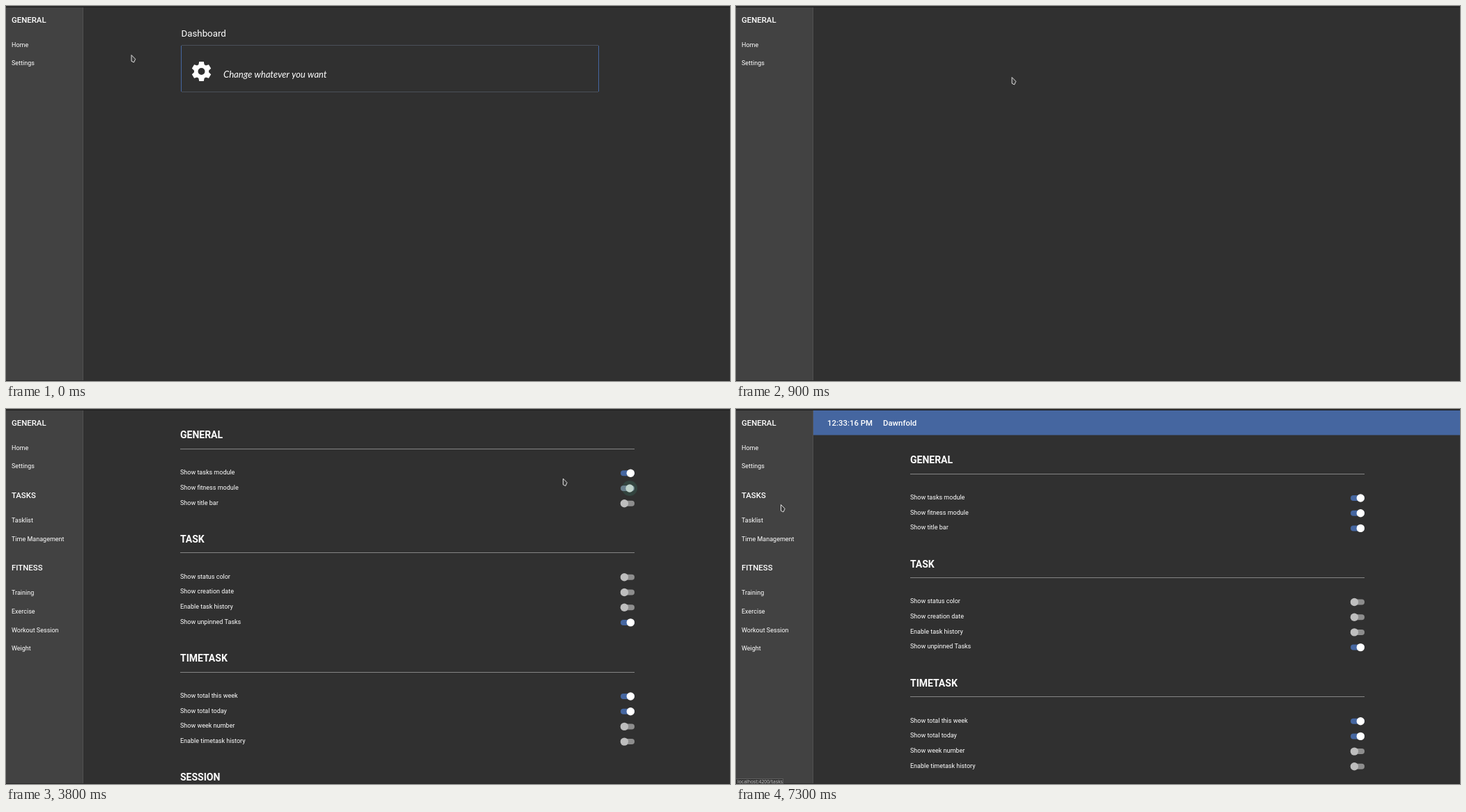
Recreate the animation shown at these times as an HTML page with a canvas. Size 1039 px wide and 539 px high, loop 8000 ms.

```html
<!DOCTYPE html>
<html lang="en">
<head>
<meta charset="utf-8">
<title>Settings demo</title>
<style>
  html, body { margin: 0; width: 100%; height: 100%; overflow: hidden; background: #303030; }
  canvas { display: block; }
</style>
</head>
<body>
<canvas id="stage" width="1039" height="539"></canvas>
<script>
const ctx = document.getElementById('stage').getContext('2d');
const LOOP = 8000, BLUE = '#4566a0', BACK = '#303030';

// Pointer positions: time, x, y, hovered item (any hovered item shows the hand).
const pointer = [
  [0, 179.5, 70], [300, 200, 73], [400, 246, 80], [500, 308, 90, 'card'],
  [600, 355, 97, 'card'], [700, 384, 101, 'card'], [800, 392, 102, 'card'],
  [900, 395.5, 102], [1000, 470, 140], [1100, 558, 173], [1200, 606, 168],
  [1300, 662, 158], [1400, 718, 147], [1500, 768, 137], [1600, 808, 129],
  [1700, 842, 121], [1800, 866, 114], [1900, 880, 110], [2000, 885, 107, 'fitness'],
  [2100, 887, 102, 'tasks'], [2200, 889, 99, 'tasks'], [2300, 890, 97, 'tasks'],
  [2400, 891, 95, 'tasks'], [2500, 892, 94, 'tasks'], [2600, 893, 93, 'tasks'],
  [3300, 893, 112, 'fitness'], [3800, 799, 99.5], [4300, 74, 185, 'link'],
  [4700, 36, 308, 'link'], [5300, 704, 168], [5700, 893.5, 137, 'title'],
  [6300, 895, 137], [6900, 144, 101], [7300, 64, 137]
];

const menu = [
  ['GENERAL', 'Home', 'Settings'],
  ['TASKS', 'Tasklist', 'Time Management'],
  ['FITNESS', 'Training', 'Exercise', 'Workout Session', 'Weight']
];

// Rows: label, then true, or the id of a switch that changes over time.
const sections = [
  ['GENERAL', ['Show tasks module', 'tasks'], ['Show fitness module', 'fitness'], ['Show title bar', 'title']],
  ['TASK', ['Show status color'], ['Show creation date'], ['Enable task history'], ['Show unpinned Tasks', true]],
  ['TIMETASK', ['Show total this week', true], ['Show total today', true], ['Show week number'], ['Enable timetask history']],
  ['SESSION']
];
const switchedOn = { tasks: 3300, fitness: 3800, title: 6300 };
const rippleEnd = { fitness: 4300, title: 6900 };

function rect(x, y, w, h, color) {
  ctx.fillStyle = color;
  ctx.fillRect(x, y, w, h);
}

function disc(x, y, r, color) {
  ctx.fillStyle = color;
  ctx.beginPath();
  ctx.arc(x, y, r, 0, 7);
  ctx.fill();
}

// Places text by the middle of its capitals.
function text(str, x, middle, size, weight = '400', color = '#fff', family = 'Roboto') {
  ctx.font = `${weight} ${size}px ${family}, sans-serif`;
  ctx.fillStyle = color;
  ctx.fillText(str, x, middle + size * 0.355);
}

function sidebar(t) {
  rect(0, 2, 110, 537, '#424242');
  rect(110, 2, 1, 537, '#505050');
  const groups = t >= 3800 ? 3 : t >= 3300 ? 2 : 1;
  menu.slice(0, groups).forEach(([head, ...items], g) => {
    const y = 19.5 + g * 104.3;
    text(head, 8, y, 11.4, '500');
    items.forEach((item, i) => text(item, 8, y + 35.9 + i * 26.75, 9));
  });
}

function gear(x, y) {
  ctx.save();
  ctx.translate(x, y);
  ctx.scale(1.42, 1.42);
  ctx.beginPath();
  for (let i = 0; i < 6; i++) {
    for (const [px, py] of [[-2.9, -6.9], [-2.3, -9.8], [2.3, -9.8], [2.9, -6.9]]) ctx.lineTo(px, py);
    ctx.rotate(Math.PI / 3);
  }
  ctx.closePath();
  ctx.moveTo(3.5, 0);
  ctx.arc(0, 0, 3.5, 0, 7);
  ctx.fillStyle = '#fff';
  ctx.fill('evenodd');
  ctx.restore();
}

function dashboard(hovered) {
  text('Dashboard', 251.5, 39, 13.3);
  if (hovered) rect(251, 57, 600, 67, '#474546');
  rect(252, 56, 598, 1, '#4a5059');
  rect(252, 123, 598, 1, '#4a5059');
  rect(251, 57, 1, 66, BLUE);
  rect(850, 57, 1, 66, BLUE);
  gear(280.5, 94);
  text('Change whatever you want', 312, 98.5, 13.1, 'italic 400', '#fff', 'Lato');
}

function toggle(id, y, t, hover) {
  const on = id === true || t >= switchedOn[id];
  const clicked = on && t < rippleEnd[id];
  const x = clicked ? 895 : on ? 896.3 : 887.4;
  if (clicked) disc(x, y, 11, '#33443f');
  else if (id && id === hover) disc(x, y, 11, '#3b3b3b');
  ctx.fillStyle = clicked ? '#6a808d' : on ? BLUE : '#8d8d8d';
  ctx.beginPath();
  ctx.roundRect(882, y - 4, 20, 8, 4);
  ctx.fill();
  disc(x, y, 5.7, clicked ? '#bfd3cb' : on ? '#fff' : '#bdbdbd');
}

function settings(t, hover) {
  let y = t >= 6300 ? 73.2 : 37.5;
  for (const [head, ...rows] of sections) {
    text(head, 250, y, 14, '700');
    rect(250, Math.round(y + 19.3), 652, 1, '#858585');
    rows.forEach(([label, id], i) => {
      const rowY = y + 53.5 + i * 21.7;
      text(label, 250, rowY, 9);
      toggle(id, rowY + 1.3, t, hover);
    });
    y += 84.4 + rows.length * 21.7;
  }
}

function titleBar(t) {
  rect(111, 2, 928, 35.5, BLUE);
  text(`12:33:${t >= 7300 ? 16 : 15} PM`, 131, 19.7, 11.4, '500');
  text('Dawnfold', 211, 19.7, 11.4, '500');
}

function linkStatus() {
  rect(0, 531, 68, 8, '#5c5c5c');
  rect(0, 532, 67, 7, '#363636');
  text('localhost:4200/tasks', 2, 536, 6.8, '400', '#c4c4c4', 'Noto Sans');
}

const arrowShape = new Path2D('M.5.5L6.2 6.3L4 11L.5 9.3Z');
const handShape = new Path2D('M3 7V1.5Q3 .5 4 .5T5 1.5V5L9.3 6Q10.7 6.5 10.3 8L9.3 12H4.8L1 8.4Q.7 7.2 1.8 7Z');

function drawPointer(x, y, hand) {
  const shape = hand ? handShape : arrowShape;
  ctx.save();
  ctx.translate(x, y);
  ctx.fillStyle = '#3a3a3a';
  ctx.strokeStyle = '#e0e0e0';
  ctx.lineWidth = 1;
  ctx.fill(shape);
  ctx.stroke(shape);
  ctx.restore();
}

function draw(t) {
  const [, x, y, hover] = pointer.findLast(key => key[0] <= t);
  rect(0, 0, 1039, 539, BACK);
  if (t < 900) dashboard(hover === 'card');
  else if (t >= 1000) settings(t, hover);
  if (t >= 6300) titleBar(t);
  sidebar(t);
  rect(0, 0, 1039, 1, '#343434');
  rect(0, 1, 1039, 1, '#1d1d1d');
  rect(0, 538, 1039, 1, '#2a2a2a');
  if (t >= 7300) linkStatus();
  drawPointer(x, y, hover);
}

function tick(now) {
  draw(now % LOOP);
  requestAnimationFrame(tick);
}
requestAnimationFrame(tick);
</script>
</body>
</html>
```
